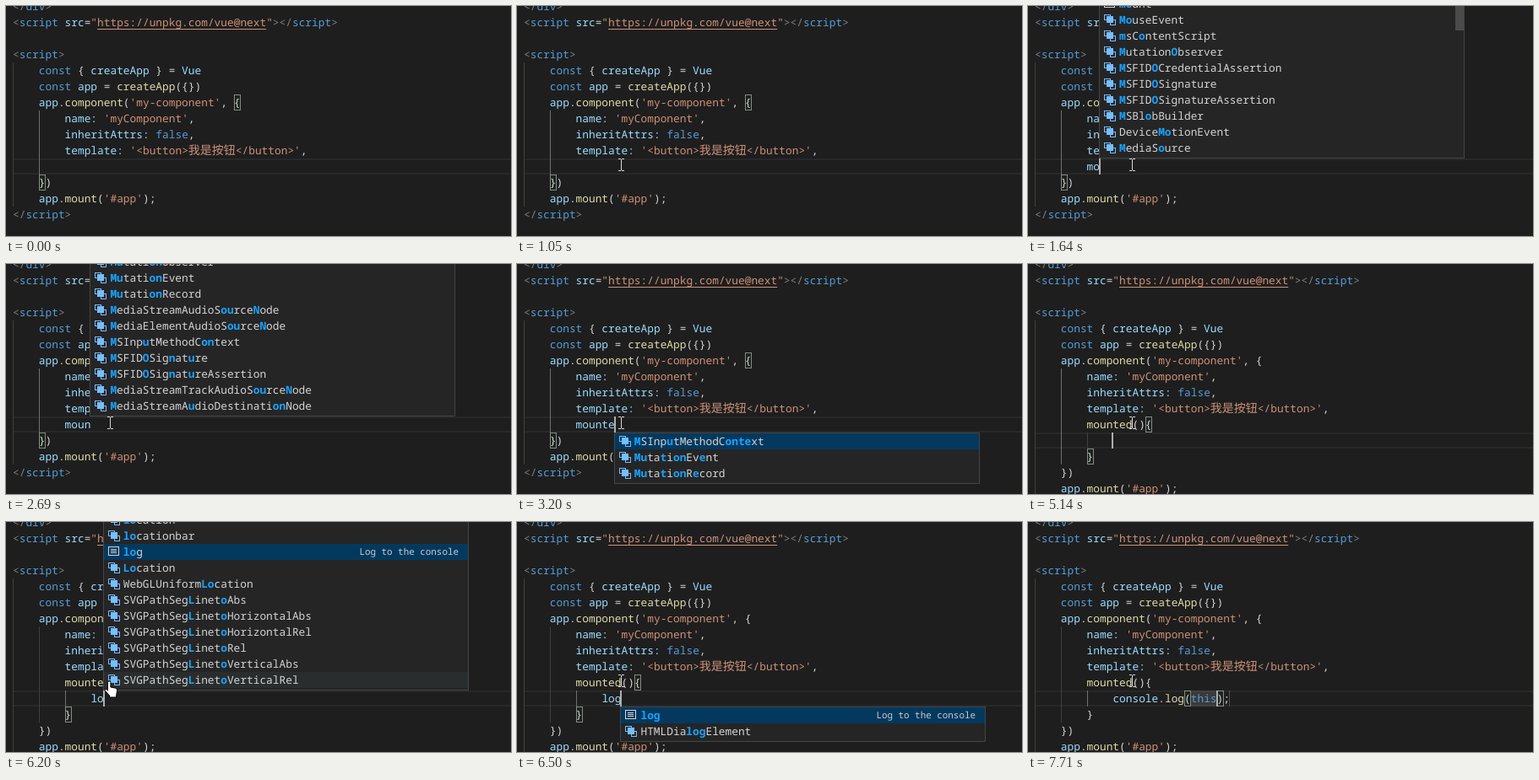
Recreate the animation shown at these times as an HTML page with a canvas. Size 598 px wide and 273 px high, loop 8000 ms.

```html
<!DOCTYPE html>
<html lang="en">
<head>
<meta charset="utf-8">
<title>Typing a mounted hook</title>
<style>
  html, body { margin: 0; width: 100%; height: 100%; overflow: hidden; background: #1e1e1e; }
  canvas { display: block; }
</style>
</head>
<body>
<canvas id="stage" width="598" height="273"></canvas>
<script>
const ctx = document.getElementById('stage').getContext('2d');
const LOOP = 8000, CHAR = 7.698, LINE = 19, LEFT = 8, TOP = -9;
const MONO = '"Noto Sans Mono", "DejaVu Sans Mono", monospace';
const CODE = `12.83px ${MONO}`, BOLD = `bold ${CODE}`, SMALL = `10.9px ${MONO}`;
const CJK = '14px "Noto Sans CJK SC", "Noto Sans CJK JP", sans-serif';
const COLORS = {
  t: '#808080', k: '#569cd6', v: '#9cdcfe', f: '#dcdcaa',
  s: '#ce9178', u: '#ce9178', c: '#ce9178', p: '#d4d4d4'
};

// Each line: indent, then pairs of colour key and text.
const HEAD = [
  [0, 't', '</', 'k', 'div', 't', '>'],
  [0, 't', '<', 'k', 'script ', 'v', 'src', 'p', '=', 's', '"', 'u', 'https://unpkg.com/vue@next',
    's', '"', 't', '></', 'k', 'script', 't', '>'],
  [0],
  [0, 't', '<', 'k', 'script', 't', '>'],
  [4, 'k', 'const ', 'p', '{ ', 'v', 'createApp', 'p', ' } = ', 'v', 'Vue'],
  [4, 'k', 'const ', 'v', 'app', 'p', ' = ', 'f', 'createApp', 'p', '({})'],
  [4, 'v', 'app', 'p', '.', 'f', 'component', 'p', '(', 's', "'my-component'", 'p', ', {'],
  [8, 'v', 'name: ', 's', "'myComponent'", 'p', ','],
  [8, 'v', 'inheritAttrs: ', 'k', 'false', 'p', ','],
  [8, 'v', 'template: ', 's', "'<button>", 'c', '我是按钮', 's', "</button>'", 'p', ',']
];
const TAIL = [
  [4, 'p', '})'],
  [4, 'v', 'app', 'p', '.', 'f', 'mount', 'p', '(', 's', "'#app'", 'p', ');'],
  [0, 't', '</', 'k', 'script', 't', '>']
];

// Start time, row being edited, its text with | at the caret, caret shown.
const STEPS = [
  [0, 10, '|', 0], [510, 10, '|', 1], [1050, 10, '|', 0],
  [1490, 10, 'm|', 1], [1640, 10, 'mo|', 1], [1940, 10, 'mou|', 1],
  [2240, 10, 'moun|', 1], [2690, 10, 'moun|', 0], [2840, 10, 'mount|', 1],
  [3200, 10, 'mounte|', 1], [3350, 10, 'mounted|', 1], [3800, 10, 'mounted|', 0],
  [4390, 10, 'mounted(|)', 1], [4840, 10, 'mounted(){|}', 1],
  [5140, 11, '|', 1], [5600, 11, '|', 0], [5900, 11, 'l|', 1], [6050, 11, 'l|', 1],
  [6200, 11, 'lo|', 1], [6350, 11, 'log|', 1],
  [6650, 11, 'console.log(|);', 1], [7110, 11, 'console.log(|);', 0],
  [7410, 11, 'console.log(th|);', 1], [7560, 11, 'console.log(thi|);', 1],
  [7710, 11, 'console.log(this|);', 1]
];

// Suggestions: _matched_ parts, # marks a plain word, > a snippet.
const LINETO = ['Abs', 'HorizontalAbs', 'HorizontalRel', 'Rel', 'VerticalAbs', 'VerticalRel'];
const POPUPS = {
  mo: ['#_mo_unt', '_Mo_useEvent', '_m_sC_o_ntentScript', '_M_utation_O_bserver',
    '_M_SFID_O_CredentialAssertion', '_M_SFID_O_Signature', '_M_SFID_O_SignatureAssertion',
    '_M_SBl_o_bBuilder', 'Device_Mo_tionEvent', '_M_ediaS_o_urce'],
  mou: ['_Mou_seEvent', '_M_ediaS_ou_rce', '_Mu_tation_O_bserver', '_Mu_tati_o_nEvent',
    '_Mu_tati_o_nRecord', '_M_SFID_O_Signat_u_re', '_M_SFID_O_Signat_u_reAssertion',
    '_M_ediaStreamAudioS_ou_rceNode', '_M_ediaElementAudioS_ou_rceNode', '_M_SInp_u_tMeth_o_dContext'],
  moun: ['_Mu_tati_on_Observer', '_Mu_tati_on_Event', '_Mu_tati_on_Record',
    '_M_ediaStreamAudioS_ou_rce_N_ode', '_M_ediaElementAudioS_ou_rce_N_ode',
    '_M_SInp_u_tMethodC_on_text', '_M_SFID_O_Sig_n_at_u_re', '_M_SFID_O_Sig_n_at_u_reAssertion',
    '_M_ediaStreamTrackAudioS_ou_rce_N_ode', '_M_ediaStreamA_u_dioDestinati_on_Node'],
  mount: ['#_mount_', '_M_SInp_u_tMethodC_ont_ext', '_M_ediaStreamA_u_dioDestinati_on_Node', '_Mu_ta_t_i_on_Event'],
  mounte: ['_M_SInp_u_tMethodC_onte_xt', '_Mu_ta_t_i_on_Ev_e_nt', '_Mu_ta_t_i_on_R_e_cord'],
  l: ['_l_ength', '_l_ocation', '_l_ocationbar', '>_l_og', '_L_ocation',
    ...LINETO.map(end => 'SVGPathSeg_L_ineto' + end)],
  lo: ['_lo_cation', '_lo_cationbar', '>_lo_g', '_Lo_cation', 'WebGLUniform_Lo_cation',
    ...LINETO.map(end => 'SVGPathSeg_L_inet_o_' + end)],
  log: ['>_log_', 'HTMLDia_log_Element']
};
const HAND = new Path2D('M4 2.5a1.7 1.7 0 0 1 3.4 0V8l6 1.2q2 .6 1.8 3l-1 5V20H6v-2L1 12.5q-1.3-2 1-2.2L4 12Z');

const colX = col => LEFT + col * CHAR;
const rowY = row => TOP + row * LINE;

function rect(color, x, y, w, h) {
  ctx.fillStyle = color;
  ctx.fillRect(x, y, w, h);
}
function outline(color, x, y, w, h) {
  ctx.strokeStyle = color;
  ctx.lineWidth = 1;
  ctx.strokeRect(Math.round(x) + .5, Math.round(y) + .5, w - 1, h - 1);
}
function text(str, x, y, color, font = CODE) {
  ctx.font = font;
  ctx.fillStyle = color;
  ctx.fillText(str, x, y);
  return x + ctx.measureText(str).width;
}

function drawLine([indent, ...tokens], row) {
  let x = colX(indent);
  for (let i = 0; i < tokens.length; i += 2) {
    const [key, str] = [tokens[i], tokens[i + 1]], color = COLORS[key];
    const end = text(str, x, rowY(row) + 14, color, key === 'c' ? CJK : CODE);
    if (key === 'u') rect(color, x, rowY(row) + 17, end - x, 1);
    x = end;
  }
}

function tokenize(str) {
  const known = str.includes('(') ? { mounted: 'f', log: 'f', this: 'k' } : {};
  return str.split(/(\W+)/).flatMap(part => [known[part] || (/\w/.test(part) ? 'v' : 'p'), part]);
}

function bracket(row, col) {
  rect('rgba(0,100,0,.1)', colX(col), rowY(row), CHAR, LINE);
  outline('#888', colX(col), rowY(row), 8, LINE);
}

function guide(col, from, to, active) {
  rect(active ? '#707070' : '#404040', Math.round(colX(col)), rowY(from), 1, (to - from + 1) * LINE);
}

function icon(kind, x, y) {
  if (kind) {
    outline('#d4d4d4', x + 1, y + 3, 13, 11);
    if (kind === '>') for (const dy of [6, 8, 10]) rect('#d4d4d4', x + 4, y + dy, 7, 1);
    return;
  }
  outline('#75beff', x + 1, y + 3, 8, 7);
  outline('#75beff', x + 8, y + 9, 7, 7);
  rect('#75beff', x + 4, y + 5, 8, 8);
}

function drawPopup(word, row, x, hover) {
  const items = POPUPS[word], below = items.length < 6, width = 433;
  const left = Math.round(x - 1), lineTop = rowY(row);
  const top = below ? lineTop + LINE : lineTop - 3 - items.length * LINE;
  const first = below ? top + 1 : top;
  const boxTop = below ? top : top - 50;
  const boxHeight = below ? items.length * LINE + 4 : lineTop - boxTop;
  rect('#252526', left, boxTop, width, boxHeight);
  outline('#454545', left, boxTop, width, boxHeight);
  items.forEach((item, i) => {
    const y = first + i * LINE, kind = /^[#>]/.test(item) ? item[0] : '';
    const selected = kind === '>' || (below && i === 0);
    if (selected) rect('#04395e', left + 1, y, width - 2, LINE);
    else if (hover && i === items.length - 1) rect('#2a2d2e', left + 1, y, width - 2, LINE);
    icon(kind, left + 5, y);
    let tx = x + 23;
    item.slice(kind.length).split('_').forEach((part, j) => {
      tx = text(part, tx, y + 14, j % 2 ? '#18a3ff' : '#d4d4d4', j % 2 ? BOLD : CODE);
    });
    if (kind === '>') {
      ctx.textAlign = 'right';
      text('Log to the console', left + width - 12, y + 13, '#c5cdd3', SMALL);
      ctx.textAlign = 'left';
    }
  });
  if (word === 'mo') rect('#4b4b4c', left + width - 11, 0, 10, 29);
}

function drawMouse(t, hand) {
  if (t < 70) return;
  if (hand) {
    ctx.save();
    ctx.translate(116.5, 188);
    ctx.fillStyle = '#fff';
    ctx.strokeStyle = '#000';
    ctx.fill(HAND);
    ctx.stroke(HAND);
    ctx.restore();
    return;
  }
  const step = Math.min(5, Math.floor((t - 70) / 138));
  const p = 1 - (1 - step / 5) ** 2;
  const x = Math.round(348 - 225 * p);
  const y = Math.round(255 - 67 * p - 34 * Math.sin(Math.PI * p));
  rect('#d8d8d8', x, y - 6, 1, 13);
  for (const dy of [-7, 7]) {
    rect('#d8d8d8', x - 3, y + dy, 3, 1);
    rect('#d8d8d8', x + 1, y + dy, 3, 1);
  }
}

function draw(t) {
  const [, row, marked, caretOn] = STEPS.findLast(step => step[0] <= t);
  const typed = marked.replace('|', ''), caret = marked.indexOf('|');
  const inBody = row === 11, indent = inBody ? 12 : 8;
  const caretX = colX(indent + caret);
  const lines = [...HEAD];
  if (inBody) lines.push([8, ...tokenize('mounted(){')], [12, ...tokenize(typed)], [8, 'p', '}']);
  else lines.push([8, ...tokenize(typed)]);
  lines.push(...TAIL);

  rect('#1e1e1e', 0, 0, 598, 273);
  rect('#282828', LEFT, rowY(row), 590, 2);
  rect('#282828', LEFT, rowY(row) + LINE - 2, 590, 2);

  const bodyActive = t >= 5900;
  guide(0, 4, lines.length - 2, false);
  guide(4, 7, inBody ? 12 : 10, !bodyActive);
  if (inBody) guide(8, 11, 11, bodyActive);

  const open = Math.max(...['(', '{'].map(c => marked.lastIndexOf(c, caret)));
  if (open >= 0) {
    bracket(row, indent + open);
    bracket(row, indent + caret);
  } else if (inBody) {
    bracket(10, 17);
    bracket(12, 8);
  } else {
    bracket(6, 34);
    bracket(11, 4);
  }
  if (inBody && open >= 0) {
    const start = colX(indent + open + 1);
    rect('rgba(124,124,124,.3)', start, rowY(row), Math.max(2, caretX - start), LINE);
    rect('#525252', Math.round(colX(indent + typed.length)) - 1, rowY(row), 1, LINE);
  }

  lines.forEach(drawLine);
  if (caretOn) rect('#aeafad', Math.round(caretX - 1), rowY(row), 2, LINE);

  const popup = POPUPS[typed] && !(typed === 'l' && t < 6050);
  const hand = inBody && popup && typed !== 'log';
  if (popup) drawPopup(typed, row, caretX, hand);
  drawMouse(t, hand);
}

ctx.textRendering = 'geometricPrecision';
const start = performance.now();
function frame() {
  draw((performance.now() - start) % LOOP);
  requestAnimationFrame(frame);
}
frame();
</script>
</body>
</html>
```
